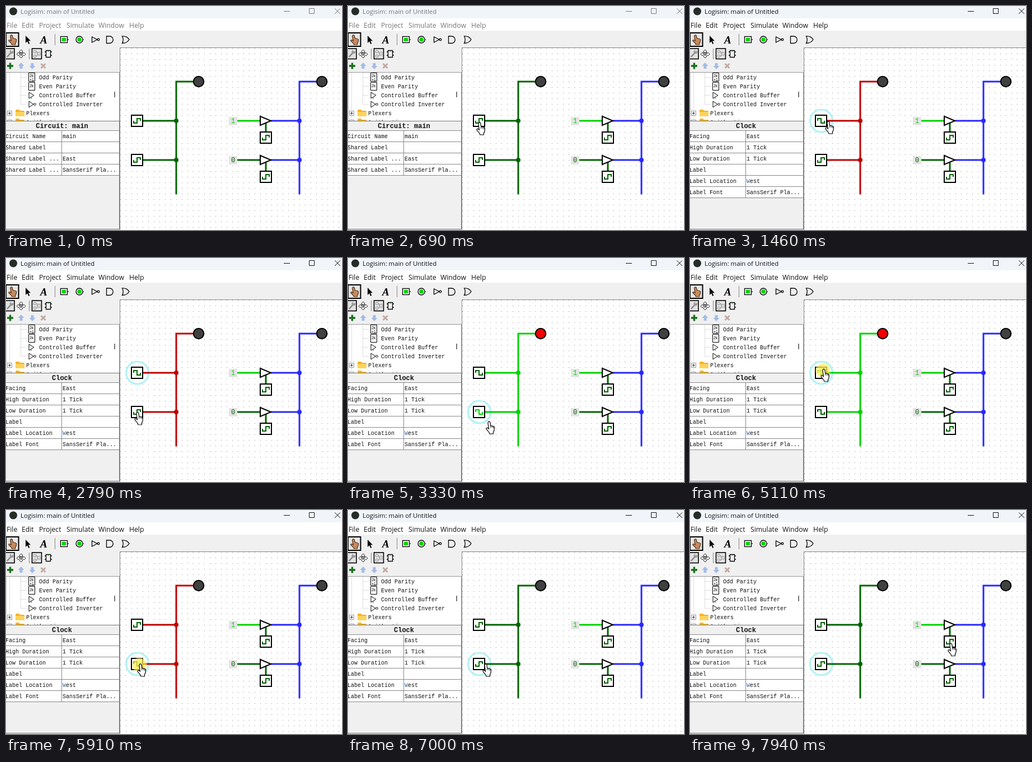
An HTML page that plays this animation: 600 by 400 pixels, repeating every 8 s.

```html
<!DOCTYPE html>
<html lang="en">
<head>
<meta charset="utf-8">
<title>Logisim</title>
<style>
html, body { margin: 0; width: 100%; height: 100%; overflow: hidden; background: #fff; }
svg { display: block; width: 600px; height: 400px; }
.ui { font: 12.2px "Open Sans", "Noto Sans", sans-serif; }
.title { font-size: 11.35px; }
.mono { font: 10px "Liberation Mono", "DejaVu Sans Mono", monospace; fill: #111; }
.head { font-size: 12px; font-weight: bold; text-anchor: middle; }
.line { fill: none; stroke: #000; stroke-width: 1.3; }
.wire { fill: none; stroke: currentColor; stroke-width: 3; }
.dot { fill: currentColor; }
.low { color: #006400; }
.high { color: #00d200; }
.float { color: #2828ff; }
.wave { fill: none; stroke: currentColor; stroke-width: 2; }

/* One loop is 8 s, so 1% is 80 ms. */
.anim { animation: 8s step-end infinite; }
#chrome { animation-name: chrome; }
#bus { animation-name: bus; }
#lamp { animation-name: lamp; }
#before { animation-name: before; }
#after { animation-name: after; }
#halo { animation-name: halo; }
#up1 { animation-name: up1; }
#down1 { animation-name: down1; }
#up2 { animation-name: up2; }
#down2 { animation-name: down2; }
#press { animation-name: press; }
#cursor { animation: move 8s ease-in-out infinite; }

@keyframes chrome { 0% { color: #777; } 10.6%, 100% { color: #111; } }
@keyframes bus {
  0% { color: #006400; } 12.45% { color: #c00000; } 36.85% { color: #00d200; }
  65.7% { color: #c00000; } 75.7%, 100% { color: #006400; }
}
@keyframes lamp { 0% { fill: #404040; } 36.85% { fill: #f00000; } 65.7%, 100% { fill: #404040; } }
@keyframes before { 0% { visibility: visible; } 10.6%, 100% { visibility: hidden; } }
@keyframes after { 0% { visibility: hidden; } 10.6%, 100% { visibility: visible; } }
@keyframes halo {
  0% { opacity: 0; transform: translateY(0); } 10.6% { opacity: 1; transform: translateY(0); }
  35.85% { opacity: 1; transform: translateY(70px); } 63.85% { opacity: 1; transform: translateY(0); }
  73.85%, 100% { opacity: 1; transform: translateY(70px); }
}
@keyframes up1 {
  0% { visibility: hidden; } 12.45% { visibility: visible; color: #006400; }
  63.85% { visibility: visible; color: #00d200; } 65.7%, 100% { visibility: hidden; }
}
@keyframes down1 { 0% { visibility: visible; } 12.45% { visibility: hidden; } 65.7%, 100% { visibility: visible; } }
@keyframes up2 {
  0% { visibility: hidden; } 36.85% { visibility: visible; color: #00d200; }
  63.85% { visibility: visible; color: #006400; } 75.7%, 100% { visibility: hidden; }
}
@keyframes down2 { 0% { visibility: visible; } 36.85% { visibility: hidden; } 75.7%, 100% { visibility: visible; } }
@keyframes press {
  0% { visibility: hidden; } 10.6% { visibility: visible; } 12.45% { visibility: hidden; }
  35.85% { visibility: visible; } 36.85% { visibility: hidden; }
  63.85% { visibility: visible; } 65.7% { visibility: hidden; }
  73.85% { visibility: visible; } 75.7%, 100% { visibility: hidden; }
}
@keyframes move {
  0% { transform: translate(620px, 371px); animation-timing-function: step-end; }
  .87% { transform: translate(500px, 371px); animation-timing-function: ease-out; }
  8.6% { transform: translate(229px, 207px); }
  18.2% { transform: translate(229px, 207px); animation-timing-function: step-end; }
  18.24% { transform: translate(241px, 205px); }
  26%, 27.5% { transform: translate(248px, 212px); }
  34.8%, 38.4% { transform: translate(229px, 274.5px); }
  41.6%, 43.2% { transform: translate(246px, 291px); }
  51.3% { transform: translate(222px, 208px); animation-timing-function: ease-out; }
  53.4%, 54% { transform: translate(224px, 201px); }
  58% { transform: translate(236px, 270px); }
  62%, 65.7% { transform: translate(233px, 197.5px); }
  70.75% { transform: translate(234px, 274px); }
  87.45% { transform: translate(234px, 274px); animation-timing-function: step-end; }
  87.49% { transform: translate(240px, 274px); }
  94.5% { transform: translate(466px, 262px); }
  97.25% { transform: translate(461px, 253px); }
  99.2%, 100% { transform: translate(460px, 237.5px); }
}
</style>
</head>
<body>
<svg viewBox="0 0 600 400">
  <defs>
    <pattern id="grid" x="204" y="75" width="10" height="10" patternUnits="userSpaceOnUse">
      <rect x="0" y="0" width="1" height="1" fill="#888"/>
    </pattern>
    <clipPath id="treeClip"><rect x="0" y="119" width="202" height="86"/></clipPath>
    <radialGradient id="glow">
      <stop offset="0" stop-color="#ffe93a" stop-opacity=".85"/>
      <stop offset=".8" stop-color="#ffec5c" stop-opacity=".7"/>
      <stop offset="1" stop-color="#fff08a" stop-opacity=".35"/>
    </radialGradient>
    <rect id="box" x="-10" y="-10" width="20" height="20" fill="#fff" stroke="#000" stroke-width="2"/>
    <path id="rise" class="wave" d="M-6 0V4H0V-4H6V0"/>
    <path id="fall" class="wave" d="M-6 0V-4H0V4H6V0"/>
    <path id="buffer" d="M454 197L473 205L454 213Z" fill="#fff" stroke="#000" stroke-width="2"/>
    <path id="hand" d="M4.3 1.8C5.2.5 7.3.6 7.7 2.4L8.7 8.4 13 9.4C14.8 9.9 15.5 10.9 15.4 12.4L14.9 17 13.4 20V23H6.6L6.2 20.7 1.2 14.6C.2 13 1.9 11.5 3.4 12.6L5.4 14.2 3.9 4Z"/>
    <g id="folder"><path d="M0 1.5Q0 0 1.5 0H6L8 2H14.5Q16 2 16 3.5V12H0Z" fill="#f0b429"/><path d="M0 4H16V11Q16 12 15 12H1Q0 12 0 11Z" fill="#ffd25a"/></g>
    <g id="expand"><rect x="2.5" y="-4" width="8" height="8" fill="#fff" stroke="#999"/><path d="M4 0H9M6.5 -2.5V2.5" stroke="#333"/></g>
  </defs>

  <rect width="600" height="22" fill="#f1f5fa"/>
  <rect y="22" width="600" height="22" fill="#fff"/>
  <rect y="44" width="600" height="356" fill="#f0f0f0"/>

  <circle cx="13" cy="9.5" r="7" fill="#262c26"/>
  <g id="chrome" class="ui anim" fill="currentColor">
    <text class="title" x="26" y="14">Logisim: main of Untitled</text>
    <text x="1" y="39">File</text><text x="28" y="39">Edit</text><text x="59" y="39">Project</text>
    <text x="108" y="39">Simulate</text><text x="165" y="39">Window</text><text x="220" y="39">Help</text>
    <path d="M496 9.5H507M541.5 4.5H550.5V13.5H541.5ZM587 4.5L597 14M597 4.5L587 14" fill="none" stroke="currentColor"/>
  </g>

  <!-- toolbar -->
  <rect x="0" y="48" width="22.5" height="24" fill="#e6e6e6" stroke="#000" stroke-width="2"/>
  <use href="#hand" transform="translate(4 51) scale(.95 .78)" fill="#c98a5c" stroke="#4a2810" stroke-width="1.2"/>
  <path d="M35 53V66L38 63L40.3 68L42.3 67L40 62.3H44Z"/>
  <text x="61" y="67" font-family="Liberation Serif, serif" font-size="19" font-weight="bold" font-style="italic">A</text>
  <path d="M87.5 50V70M41.5 76V95" stroke="#888"/>
  <rect x="97.5" y="54.5" width="12" height="11" class="line"/><rect x="100" y="57" width="7" height="6" fill="#00d200"/>
  <circle cx="131" cy="60" r="6" class="line"/><circle cx="131" cy="60" r="3.8" fill="#00d200"/>
  <path d="M110 60H112M137 60H139" stroke="#00a000" stroke-width="2"/>
  <path class="line" d="M153.5 55V65L163 60ZM179.5 54H185A6 6 0 0 1 185 66.500H179.500ZM207.500 54Q216 53.500 220 60Q216 66.500 207.500 66.500Q211 60 207.500 54Z"/>
  <circle cx="165" cy="60" r="1.8" class="line"/>

  <rect x="-1" y="76" width="16" height="18.500" fill="#e2e2e2" stroke="#000" stroke-width="1.6"/>
  <path d="M2 91L9 83" stroke="#888" stroke-width="2.500"/>
  <path d="M13 80A3.500 3.500 0 1 1 9 78.500L9.500 81.500Z" fill="#999"/>
  <path class="line" d="M27 81L22 86M27 81V89M27 81L32 86"/>
  <path d="M27 78L30 81L27 84L24 81ZM22 83L25 86L22 89L19 86ZM32 83L35 86L32 89L29 86ZM27 87L30 90L27 93L24 90Z" fill="#fff" stroke="#222"/>
  <rect x="46.500" y="76" width="17" height="18.500" fill="#e6e6e6" stroke="#000" stroke-width="1.6"/>
  <path d="M49.500 79.500H53.500V83.500H49.500ZM49.500 87.500H53.500V91.500H49.500ZM57 82.500H61V88H57ZM53.500 81.500H55.500V85H57M53.500 89.500H55.500V87H57" fill="none" stroke="#999"/>
  <path class="line" d="M71.500 79.500H79.500V91.500H71.500ZM69 82H71M69 88H71M80 82H82M80 88H82"/>
  <path d="M74 79.500A1.500 1.500 0 0 0 77 79.500" stroke="#0a0" fill="none"/>
  <path d="M2 107H13M7.500 101.500V112.500" stroke="#17701a" stroke-width="3.400"/>
  <path d="M27 101L32.500 107H29.500V112H24.500V107H21.500ZM47 113L41.500 107H44.500V102H49.500V107H52.500Z" fill="#a3bbe6"/>
  <path d="M62.500 103L70.500 111M70.500 103L62.500 111" stroke="#c3a9a2" stroke-width="3"/>

  <!-- component tree -->
  <rect x="0" y="118.500" width="202.500" height="87" fill="#fff" stroke="#999"/>
  <g clip-path="url(#treeClip)">
    <path d="M6.500 119V205M26.500 119V175.500M27 127.500H37M27 143.500H37M27 159.500H37M27 175.500H37" fill="none" stroke="#bbb" stroke-dasharray="1 1"/>
    <g class="mono" id="tree"></g>
    <path d="M40.500 119.500H51.500V134.500H40.500ZM40.500 136.500H51.500V150.500H40.500ZM41 154V165L50 159.500ZM41 170V181L49 175.500Z" fill="#fff" stroke="#000"/>
    <path d="M45 163V166" stroke="#080"/><circle cx="51.500" cy="175.500" r="1.800" fill="#fff" stroke="#000"/>
    <g font-family="Liberation Sans, sans-serif" font-size="7"><text x="42" y="127">2k</text><text x="42" y="133.500">+1</text><text x="42" y="145">2k</text></g>
    <use href="#expand" y="191.500"/><use href="#folder" x="17" y="185"/>
    <use href="#expand" y="207.500"/><use href="#folder" x="17" y="201"/>
  </g>
  <rect x="193" y="153" width="2" height="10" fill="#777"/>

  <!-- properties -->
  <path d="M0 205.500H203M0 398.500H202.500V205.500" fill="none" stroke="#777"/>
  <g id="before" class="mono anim"></g>
  <g id="after" class="mono anim"></g>

  <!-- canvas -->
  <rect x="203" y="74" width="397" height="326" fill="#fff"/>
  <rect x="204" y="75" width="396" height="325" fill="url(#grid)"/>
  <path d="M203.500 400V74.500H600" fill="none" stroke="#888"/>

  <circle id="halo" class="anim" cx="234.500" cy="205" r="20" fill="none" stroke="#b0f2f4" stroke-width="3"/>
  <g id="bus" class="anim">
    <path class="wire" d="M335 135H304V336.500M244 205H304M244 275H304"/>
    <circle class="dot" cx="304" cy="205" r="4"/><circle class="dot" cx="304" cy="275" r="4"/>
  </g>
  <circle id="lamp" class="anim" cx="344" cy="135" r="9.200" stroke="#000" stroke-width="2"/>
  <g transform="translate(234 205)"><use href="#box"/><g id="down1" class="low anim"><use href="#rise"/></g><g id="up1" class="anim"><use href="#fall"/></g></g>
  <g transform="translate(234 275)"><use href="#box"/><g id="down2" class="low anim"><use href="#rise"/></g><g id="up2" class="anim"><use href="#fall"/></g></g>

  <g class="float">
    <path class="wire" d="M555 135H524V336.500M473 205H524M473 275H524"/>
    <circle class="dot" cx="524" cy="205" r="4"/><circle class="dot" cx="524" cy="275" r="4"/>
  </g>
  <circle cx="564" cy="135" r="9.200" fill="#404040" stroke="#000" stroke-width="2"/>
  <g id="gates"></g>

  <g id="cursor">
    <circle id="press" class="anim" cx="4.500" cy="3" r="13.500" fill="url(#glow)"/>
    <use href="#hand" fill="#fff" stroke="#000" stroke-width="1.200"/>
    <path d="M8.500 9V12M11.200 10V12.500M13.500 11V13" stroke="#000" stroke-width=".8"/>
  </g>
</svg>
<script>
const $ = id => document.getElementById(id);
const text = (x, y, s, extra = '') => `<text x="${x}" y="${y}" ${extra}>${s}</text>`;

function table(id, title, rows) {
  const end = 222.5 + rows.length * 20;
  let out = `<rect y="222" width="202" height="${rows.length * 20}" fill="#fff"/>` + text(100, 218, title, 'class="head"');
  let lines = `M99.5 222V${end}`;
  for (let y = 222.5; y <= end; y += 20) lines += `M0 ${y}H202`;
  out += `<path d="${lines}" stroke="#888"/>`;
  rows.forEach(([name, value], i) => {
    const y = 236 + i * 20;
    out += text(-1, y, name) + text(101, y, value);
  });
  $(id).innerHTML = out;
}

table('before', 'Circuit: main', [
  ['Circuit Name', 'main'], ['Shared Label', ''],
  ['Shared Label ...', 'East'], ['Shared Label ...', 'SansSerif Pla...']
]);
table('after', 'Clock', [
  ['Facing', 'East'], ['High Duration', '1 Tick'], ['Low Duration', '1 Tick'], ['Label', ''],
  ['Label Location', '<tspan fill="#2f69ad">W</tspan>est'], ['Label Font', 'SansSerif Pla...']
]);

$('tree').innerHTML = ['Odd Parity', 'Even Parity', 'Controlled Buffer', 'Controlled Inverter', 'Plexers', 'Arithmetic']
  .map((s, i) => text(i < 4 ? 59 : 36, 131 + i * 16, s)).join('');

$('gates').innerHTML = ['1', '0'].map((bit, i) => `
  <g transform="translate(0 ${i * 70})">
    <g class="${i ? 'low' : 'high'}">
      <rect x="398" y="198" width="15" height="15" fill="#e4e4e4"/>
      ${text(405.5, 209, bit, 'font-family="Liberation Mono, monospace" font-size="12" text-anchor="middle" fill="currentColor"')}
      <path class="wire" d="M413 205H454"/>
    </g>
    <g class="low"><path class="wire" d="M464 209V225"/></g>
    <use href="#buffer"/>
    <g class="low" transform="translate(464 235)"><use href="#box"/><use href="#rise"/></g>
  </g>`).join('');
</script>
</body>
</html>
```
